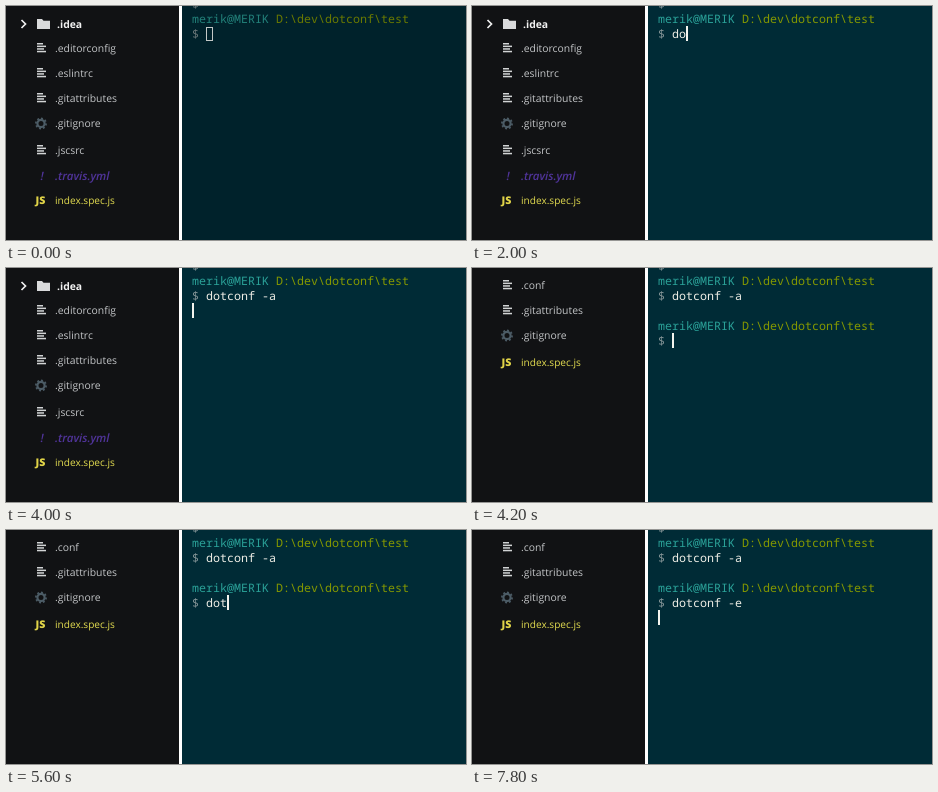
Recreate the animation shown at these times as an HTML page. Size 460 px wide and 234 px high, loop 8000 ms.

```html
<!DOCTYPE html>
<html lang="en">
<head>
<meta charset="utf-8">
<title>Terminal typing</title>
<style>
  html, body { margin: 0; width: 100%; height: 100%; overflow: hidden; background: #111214; }
  svg { display: block; width: 460px; height: 234px; }
  text { white-space: pre; text-rendering: geometricPrecision; }
  .side { font: 10.4px "Open Sans", "Noto Sans", sans-serif; fill: #c3c5c7; }
  .side .dir { font-weight: 700; fill: #f2f2f2; }
  .side .js { font-size: 10.1px; fill: #e3dc50; }
  .side .badge { font-size: 10.6px; font-weight: 800; fill: #e0d348; }
  .side .mark { font-size: 11.5px; font-style: italic; font-weight: 600; fill: #50349a; }
  .term { font: 11.667px "Noto Sans Mono", "DejaVu Sans Mono", monospace; }
</style>
</head>
<body>
<svg id="stage" viewBox="0 0 460 234">
  <rect width="460" height="234" fill="#111214"/>
  <g id="before" class="side"></g>
  <g id="after" class="side"></g>
  <rect x="173" width="3" height="234" fill="#fff"/>
  <rect id="back" x="176" width="284" height="234"/>
  <g id="term" class="term"></g>
  <rect id="box" x="200.5" y="21.5" width="6" height="13" fill="none" stroke="#c4c9c7"/>
  <rect id="bar" width="2" height="15" fill="#f4f4ee"/>
</svg>
<script>
const LOOP = 8000, CELL = 7, ROW = 15, LEFT = 186, TOP = 5;
const NS = "http://www.w3.org/2000/svg";
const $ = id => document.getElementById(id);

function add(parent, tag, attrs, content = "") {
  const el = document.createElementNS(NS, tag);
  for (const key in attrs) el.setAttribute(key, attrs[key]);
  el.textContent = content;
  parent.appendChild(el);
  return el;
}

// Sidebar icons, each centred on y
const icons = {
  lines(g, y) {
    [6, 9, 7, 9].forEach((w, i) =>
      add(g, "rect", { x: 31, y: y - 5 + i * 2.6, width: w, height: 1.5, fill: "#d2d4d5" }));
  },
  gear(g, y) {
    const at = { cx: 35, cy: y + 0.5, fill: "none", stroke: "#4c5c66" };
    add(g, "circle", { ...at, r: 3.6, "stroke-width": 2.2 });
    add(g, "circle", { ...at, r: 5.1, "stroke-width": 1.7, pathLength: 16, "stroke-dasharray": "1 1" });
  },
  mark(g, y) { add(g, "text", { x: 34.5, y: y + 4, class: "mark" }, "!"); },
  js(g, y) { add(g, "text", { x: 29.5, y: y + 4.3, class: "badge" }, "JS"); },
  dir(g, y) {
    add(g, "path", { d: `M15.5 ${y - 4}l4 4-4 4`, fill: "none", stroke: "#f0f0f0", "stroke-width": 1.7 });
    add(g, "path", { d: `M31 ${y - 5}h5l1.5 1.8h6.5v8.2h-13z`, fill: "#d9dadb" });
  }
};

function fileList(g, files) {
  for (const [name, y, icon] of files) {
    icons[icon](g, y);
    add(g, "text", { x: icon === "dir" ? 51 : 49, y: y + 4, class: icon }, name);
  }
}

fileList($("before"), [
  [".idea", 18, "dir"], [".editorconfig", 42, "lines"], [".eslintrc", 67, "lines"],
  [".gitattributes", 92, "lines"], [".gitignore", 117, "gear"], [".jscsrc", 144, "lines"],
  [".travis.yml", 170, "mark"], ["index.spec.js", 194, "js"]
]);
fileList($("after"), [
  [".conf", 17, "lines"], [".gitattributes", 42, "lines"],
  [".gitignore", 67, "gear"], ["index.spec.js", 94, "js"]
]);

// Terminal text: row 0 spans y 5 to 20
const dimmable = [];
function print(g, row, col, content, rgb) {
  const el = add(g, "text", { x: LEFT + col * CELL, y: TOP + row * ROW + 12 }, content);
  dimmable.push([el, rgb]);
  return el;
}
function prompt(g, row) {
  print(g, row, 0, "merik@MERIK", [42, 161, 152]);
  print(g, row, 12, "D:\\dev\\dotconf\\test", [133, 153, 0]);
  print(g, row + 1, 0, "$", [131, 148, 150]);
}
const term = $("term");
print(term, -1, 0, "$", [131, 148, 150]);
prompt(term, 0);
const second = add(term, "g", {});
prompt(second, 3);
const bright = [238, 238, 230];
const inputs = { 1: print(term, 1, 2, "", bright), 4: print(term, 4, 2, "", bright) };

const shade = (rgb, k) => `rgb(${rgb.map(v => Math.round(v * k))})`;

const FOCUS = 1200, DONE = 4200;
const commands = [
  { row: 1, text: "dotconf -a", enter: 4000,
    keys: [[1800, 1], [2000, 2], [2200, 3], [2400, 5], [2600, 7], [3000, 9], [3400, 10]] },
  { row: 4, text: "dotconf -e", enter: 7800,
    keys: [[5400, 2], [5600, 3], [6000, 5], [6200, 6], [6400, 7], [6600, 9], [7200, 10]] }
];
const blinkOff = [[1600, 1800], [3800, 4000], [4600, 5200], [7600, 7800]];

const typed = (cmd, t) => cmd.keys.reduce((n, [at, len]) => t >= at ? len : n, 0);

function render(t) {
  const focused = t >= FOCUS, done = t >= DONE, k = focused ? 1 : 0.8;
  $("before").style.display = done ? "none" : "";
  $("after").style.display = second.style.display = done ? "" : "none";
  $("back").setAttribute("fill", shade([0, 43, 54], k));
  for (const [el, rgb] of dimmable) el.setAttribute("fill", shade(rgb, k));
  for (const cmd of commands)
    inputs[cmd.row].textContent = cmd.text.slice(0, typed(cmd, t));

  const cmd = commands[done ? 1 : 0], entered = t >= cmd.enter;
  const col = entered ? 0 : 2 + typed(cmd, t);
  const bar = $("bar");
  bar.setAttribute("x", LEFT + col * CELL);
  bar.setAttribute("y", TOP + (cmd.row + (entered ? 1 : 0)) * ROW);
  const hidden = blinkOff.some(([a, b]) => t >= a && t < b);
  bar.style.display = focused && !hidden ? "" : "none";
  $("box").style.display = focused ? "none" : "";
}

const start = performance.now();
function tick() {
  render((performance.now() - start) % LOOP);
  requestAnimationFrame(tick);
}
tick();
</script>
</body>
</html>
```
